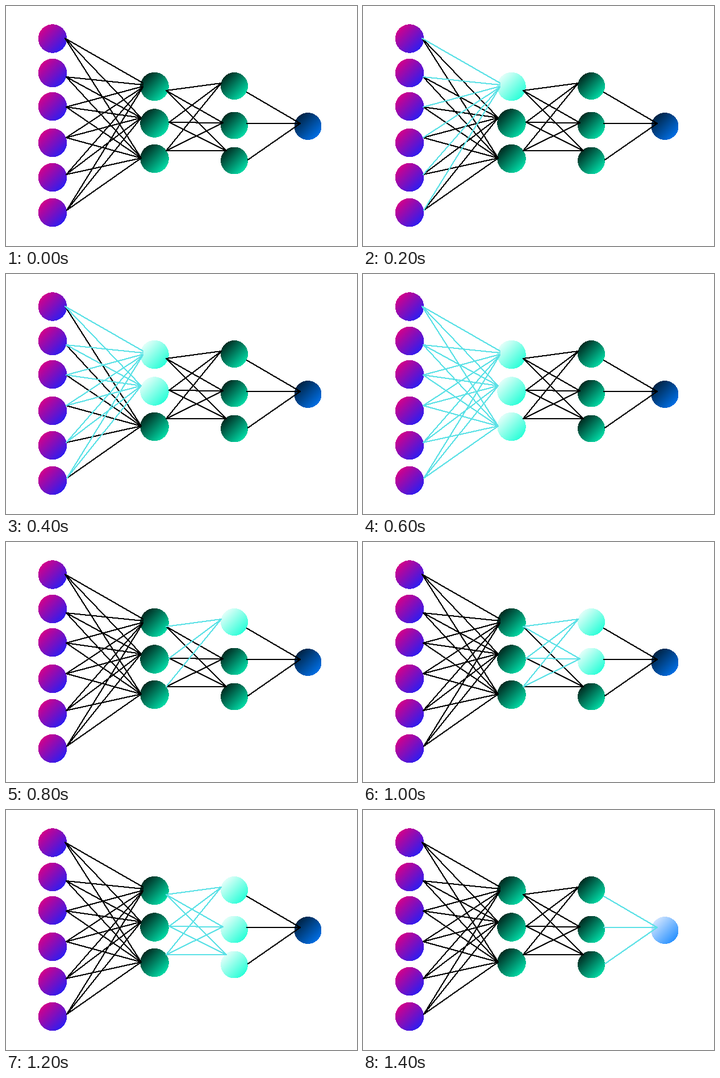
An HTML page with a canvas that plays this animation: 618 by 423 pixels, repeating every 1600 ms.

```html
<!DOCTYPE html>
<html>
<head>
<meta charset="utf-8">
<title>Neural network</title>
<style>
html, body { margin: 0; width: 100%; height: 100%; overflow: hidden; background: #fff; }
canvas { display: block; }
</style>
</head>
<body>
<canvas id="stage" width="618" height="423"></canvas>
<script>
const ctx = document.getElementById('stage').getContext('2d');
const STEP = 200, STEPS = 8, PEN = 2;
const BLACK = '#000', CYAN = '#5ce1e6';

// Gradient colours at the upper left and lower right rim
const PURPLE = ['#d2008a', '#2e1df0'];
const GREEN = ['#002a20', '#00dba6'], GREEN_LIT = ['#e2fff9', '#2affd8'];
const BLUE = ['#002242', '#006ee4'], BLUE_LIT = ['#cfe4ff', '#2a92ff'];

const layers = [
  { x: 82, r: 25.2, ys: [57.5, 118, 177, 241, 302, 364], dim: PURPLE, lit: PURPLE },
  { x: 261.5, r: 25.2, ys: [142, 206.5, 269], dim: GREEN, lit: GREEN_LIT },
  { x: 402, r: 24, ys: [141, 210.5, 272.5], dim: GREEN, lit: GREEN_LIT },
  { x: 531.5, r: 24, ys: [212], dim: BLUE, lit: BLUE_LIT }
];

// Line ends between each pair of neighbouring layers
const links = [
  {
    from: [[104, 57], [106, 125], [106, 178], [106, 232], [106, 297], [107, 360]],
    to: [[241, 141], [238, 197], [238, 268]]
  },
  {
    from: [[282, 149], [287, 205], [282, 255]],
    to: [[379, 136], [382, 206], [388, 255]]
  },
  {
    from: [[424, 152], [424, 207], [426, 271]],
    to: [[518, 207]]
  }
];

// Fills a disc row by row to keep a crisp pixel edge
function drawNode(x, y, r, [c0, c1]) {
  const d = r * Math.SQRT1_2;
  const g = ctx.createLinearGradient(x - d, y - d, x + d, y + d);
  g.addColorStop(0, c0);
  g.addColorStop(1, c1);
  ctx.fillStyle = g;
  for (let row = Math.floor(y - r); row < y + r; row++) {
    const dy = row + 0.5 - y;
    if (Math.abs(dy) >= r) continue;
    const half = Math.sqrt(r * r - dy * dy);
    const left = Math.round(x - half);
    ctx.fillRect(left, row, Math.round(x + half) - left, 1);
  }
}

// Drags a square pen along the line, one pixel at a time
function drawLine(x0, y0, x1, y1) {
  const n = Math.ceil(Math.max(Math.abs(x1 - x0), Math.abs(y1 - y0)));
  for (let i = 0; i <= n; i++) {
    const x = x0 + (x1 - x0) * i / n;
    const y = y0 + (y1 - y0) * i / n;
    ctx.fillRect(Math.round(x - PEN / 2), Math.round(y - PEN / 2), PEN, PEN);
  }
}

function drawLinks(active, count, lit) {
  ctx.fillStyle = lit ? CYAN : BLACK;
  links.forEach(({ from, to }, i) => {
    to.forEach(([tx, ty], k) => {
      if ((i + 1 === active && k < count) !== lit) return;
      from.forEach(([sx, sy]) => {
        // The first hidden node receives its lines in a narrow fan
        const fan = i === 0 && k === 0 ? Math.min(2, (sy - 165) / 20) : 0;
        drawLine(sx, sy, tx, ty + fan);
      });
    });
  });
}

function draw(step) {
  const active = Math.ceil(step / 3);
  const count = step ? (step - 1) % 3 + 1 : 0;
  ctx.fillStyle = '#fff';
  ctx.fillRect(0, 0, 618, 423);
  layers.forEach(({ x, r, ys, dim, lit }, i) => {
    ys.forEach((y, k) => drawNode(x, y, r, i === active && k < count ? lit : dim));
  });
  drawLinks(active, count, false);
  drawLinks(active, count, true);
}

const start = performance.now();
function tick() {
  const t = Math.max(0, performance.now() - start);
  draw(Math.floor(t / STEP) % STEPS);
  requestAnimationFrame(tick);
}
tick();
</script>
</body>
</html>
```
